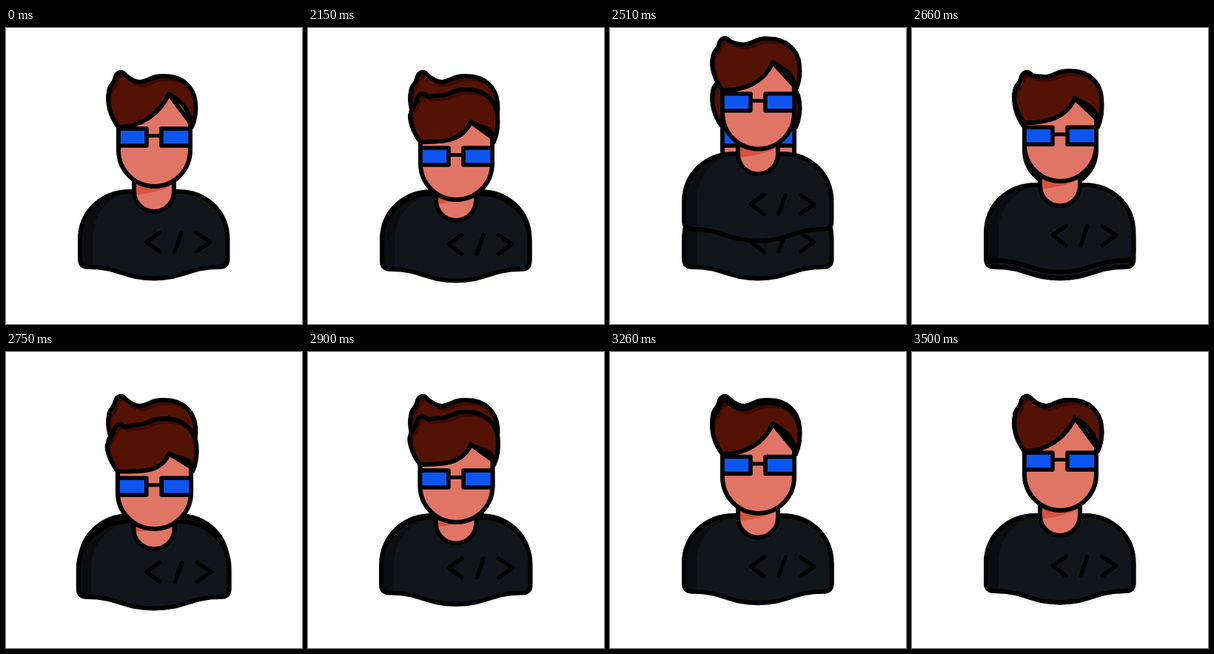
Animation, 400 px wide and 400 px high, one loop 3.56 s. Source, as an HTML page with a canvas:

```html
<!DOCTYPE html>
<html lang="en">
<head>
<meta charset="utf-8">
<title>Jumping developer</title>
<style>
  html, body { margin: 0; width: 100%; height: 100%; overflow: hidden; background: #fff; }
  canvas { display: block; width: 100vw; height: 100vh; }
</style>
</head>
<body>
<canvas id="stage" width="400" height="400"></canvas>
<script>
const ctx = document.getElementById('stage').getContext('2d');
const LOOP = 3560, START = 2150, END = 3500, STEP = 30;
const SKIN = '#e07566', SHIRT = '#10161c';

// time, body shift, head sink, hair squash, body widening
const keys = [
  [2150, 3, 15, 1, 0],
  [2180, 3.5, 15.5, 1.05, 0],
  [2300, -23, 2, .65, 0],
  [2464, -55, 1, .4, 0],
  [2660, -9, 2, .65, 0],
  [2700, 3, 6, .8, .5],
  [2790, 8, 24, 1.4, 3.2],
  [2900, 2.5, 13.5, 1, 1],
  [3080, -2, 0, -.2, 0],
  [3125, -4, -.5, -.3, 0],
  [3300, 2, 4, .3, 0],
  [3500, 0, 0, 0, 0]
];

function slope(i, k) {
  if (i === 0 || i === keys.length - 1) return 0;
  const [a, b, c] = [keys[i - 1], keys[i], keys[i + 1]];
  const before = b[0] - a[0], after = c[0] - b[0];
  return ((b[k] - a[k]) / before * after + (c[k] - b[k]) / after * before) / (before + after);
}

function poseAt(t) {
  let i = 0;
  while (i < keys.length - 2 && t >= keys[i + 1][0]) i++;
  const a = keys[i], b = keys[i + 1], span = b[0] - a[0], u = (t - a[0]) / span;
  return [1, 2, 3, 4].map(k =>
    a[k] * (1 + 2 * u) * (1 - u) ** 2 + b[k] * u * u * (3 - 2 * u) +
    span * u * (1 - u) * (slope(i, k) * (1 - u) - slope(i + 1, k) * u));
}

function shape(d, fill, width = 6) {
  const path = new Path2D(d);
  if (fill) {
    ctx.fillStyle = fill;
    ctx.fill(path);
  }
  if (width) {
    ctx.lineWidth = width;
    ctx.stroke(path);
  }
  return path;
}

// Fills a path, then paints an inner part that stays within it, then outlines it.
function shaded(d, base, paintInner) {
  const path = shape(d, base, 0);
  ctx.save();
  ctx.clip(path);
  paintInner();
  ctx.restore();
  shape(d);
}

function shifted(dx, dy, draw) {
  ctx.save();
  ctx.translate(dx, dy);
  draw();
  ctx.restore();
}

function drawBody() {
  shaded('M172 221C130 219 100 248 100 286V312Q100 323 112 323C152 323 160 338.5 200 338.5S248 323 288 323Q299.5 323 299.5 312V286C299.5 248 270 219 228 221Z',
    '#0a0e13', () =>
      shape('M176 221C140 224 117 250 117 286V340H305V215H176Z', SHIRT, 0));
  shape('M208 276.5L190 289L208 302.5M237 276.5L228 302.5M257 276.5L276 289L257 302.5', null, 5.5);
}

function drawNeck() {
  shaded('M173 195V221A27 27 0 0 0 227 221V195Z', SKIN, () =>
    shape('M170 195V226Q205 224 230 210V195Z', '#d75240', 0));
}

function drawHead(squash) {
  const curl = 11 * squash, brow = 2 * squash, peak = 89 + 20 * squash;
  const y = v => v + curl, low = 134 + brow;
  shape(`M152 ${low - 6}V165A48.5 49 0 0 0 249 165V${low - 6}L220 ${peak}Z`, SKIN);
  const hair = `M152 ${low}C140 ${118 + brow} 136 ${100 + brow} 139 ${y(86)}
    C140 ${y(76)} 145 ${y(77)} 147 ${y(69)}C149 ${y(59)} 156 ${y(57)} 162 ${y(64)}
    Q172 73 182 73C194 71 198 64 215 65C240 65 254 82 256 100Q258 ${118 + brow} 251 ${low}
    C249 ${112 + brow} 238 ${peak + 10} 220 ${peak}
    C208 ${peak + 27} 182 ${low} 152 ${low}Z`;
  shaded(hair, '#3d0a02', () => shifted(4, 7, () => {
    shape(hair, '#541205', 0);
    shape(`M148 ${low - 22}L152 ${low}L185 ${low}L216 ${peak - 3}L254 ${low}V100Z`, '#541205', 0);
  }));
  shifted(0, 8 * squash, () => {
    shape('M190 145.5H210', null, 5);
    shape('M152 136H190V159H152ZM210 136H249V159H210Z', '#0d55f0', 5.5);
  });
}

function drawFigure([lift, sink, squash, widen]) {
  shifted(200, lift, () => {
    ctx.scale(1 + widen / 100, 1);
    ctx.translate(-200, 0);
    drawBody();
    shifted(0, sink * .6, drawNeck);
    shifted(0, sink, () => drawHead(squash));
  });
}

function frame(now) {
  const t = now % LOOP;
  ctx.fillStyle = '#fff';
  ctx.fillRect(0, 0, 400, 400);
  ctx.lineCap = ctx.lineJoin = 'round';
  ctx.strokeStyle = '#000';
  drawFigure([0, 0, 0, 0]);
  // The resting figure stays visible behind the jumping one.
  if (t >= START) {
    const stepped = START + Math.floor((t - START) / STEP) * STEP;
    drawFigure(poseAt(Math.min(stepped, END)));
  }
  requestAnimationFrame(frame);
}

const begin = performance.now();
const tick = () => frame(performance.now() - begin);
requestAnimationFrame(function loop() {
  tick();
});
</script>
</body>
</html>
```
